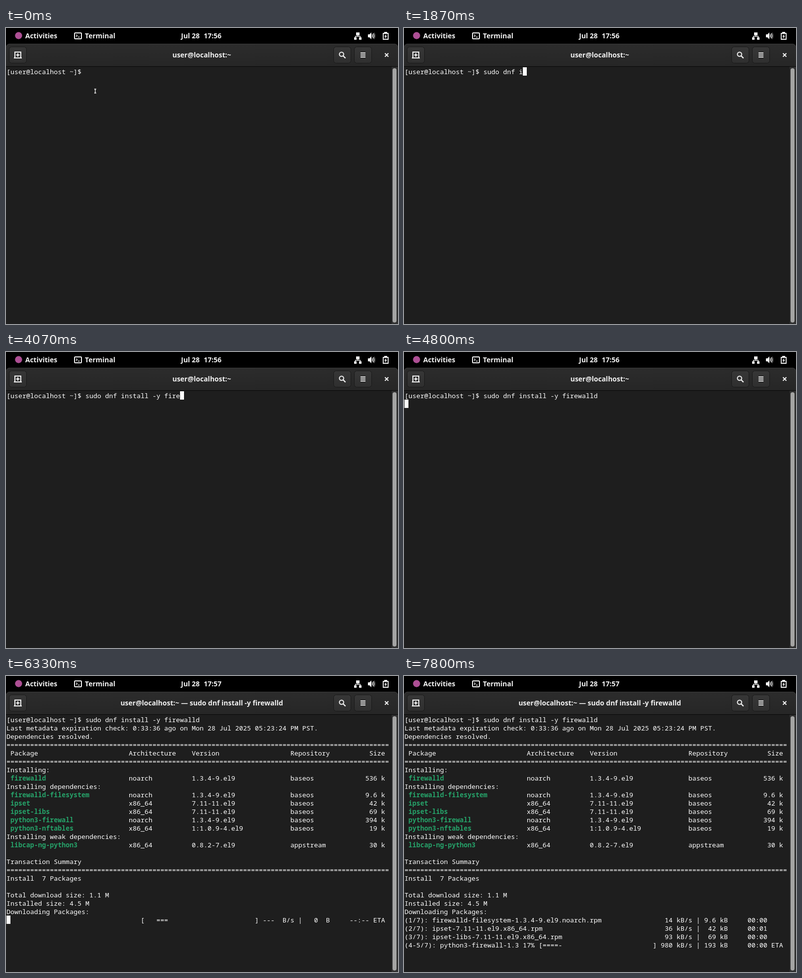
Recreate the animation shown at these times as an HTML page. Size 795 by 603 pixels, loop 8000 ms.

```html
<!DOCTYPE html>
<html lang="en">
<head>
<meta charset="utf-8">
<title>Terminal</title>
<style>
  html, body { margin: 0; width: 100%; height: 100%; overflow: hidden; background: #000; }
  svg { display: block; width: 795px; height: 603px; }
  text { white-space: pre; }
  .ui { font: 600 14px "Noto Sans", "Open Sans", sans-serif; fill: #f2f2f2; }
  .mono { font: 13.3333px "Noto Sans Mono", monospace; fill: #fff; font-variant-ligatures: none; }
  .pkg { font-weight: 700; fill: #26a269; }
  .line { fill: none; stroke: #f2f2f2; stroke-width: 2; }
</style>
</head>
<body>
<svg viewBox="0 0 795 603" xmlns="http://www.w3.org/2000/svg">
  <defs>
    <linearGradient id="bar" x1="0" y1="0" x2="0" y2="1">
      <stop offset="0" stop-color="#2c2c2c"/><stop offset="1" stop-color="#262626"/>
    </linearGradient>
    <linearGradient id="btn" x1="0" y1="0" x2="0" y2="1">
      <stop offset="0" stop-color="#373737"/><stop offset="1" stop-color="#2f2f2f"/>
    </linearGradient>
  </defs>
  <rect width="795" height="603" fill="#000"/>

  <!-- top bar -->
  <circle cx="25.5" cy="15.5" r="7.2" fill="#ad4f94"/>
  <text class="ui" x="39" y="21">Activities</text>
  <rect class="line" x="139" y="10" width="14" height="12" rx="1.5" stroke-width="1.8"/>
  <path class="line" d="M142 13.5l2.5 2.2l-2.5 2.2M146 18.5h3.5" style="stroke-width:1.3"/>
  <text class="ui" x="160" y="21">Terminal</text>
  <text class="ui" x="355" y="21">Jul 28</text>
  <text class="ui" id="clock" x="401" y="21"></text>
  <g fill="#f2f2f2">
    <path d="M710 9h7v6h-7zM706 19h5v5h-5zM716 19h5v5h-5z"/>
    <path d="M734 13h3l4-4v14l-4-4h-3z"/>
  </g>
  <path class="line" d="M713.5 15v2M708.5 19v-2h10v2" style="stroke-width:1.4"/>
  <path class="line" d="M742.5 13q2 3 0 6M744.5 11q3.6 5 0 10" style="stroke-width:1.5"/>
  <path class="line" d="M746.5 9.5q4 6.500 0 13" style="stroke-width:1.2;stroke:#777"/>
  <path class="line" d="M765 11h10v12h-10z" style="stroke-width:1.8"/>
  <path d="M767 8h6v3h-6zM771.500 12.500l-4.500 5h2.500l-1 4l4.500-5h-2.500z" fill="#f2f2f2"/>

  <!-- header bar -->
  <path d="M0 78V40q0-8 8-8h779q8 0 8 8v38z" fill="url(#bar)"/>
  <path d="M1 38q1.500-5.500 7-5.500h779q5.500 0 7 5.500" fill="none" stroke="#3a3a3a"/>
  <g fill="url(#btn)" stroke="#191919">
    <rect x="6.500" y="38.500" width="35" height="33" rx="5"/>
    <rect x="664.500" y="38.500" width="35" height="33" rx="5"/>
    <rect x="706.500" y="38.500" width="35" height="33" rx="5"/>
  </g>
  <path class="line" d="M18 60V49h12v11M16 61h16M20.500 55h7M24 51.500v7"/>
  <circle class="line" cx="680.500" cy="53.500" r="4.300"/>
  <path class="line" d="M683.500 56.500l5 5" style="stroke-width:2.400"/>
  <path class="line" d="M719 51h10M719 55h10M719 59h10"/>
  <path class="line" d="M768.500 51.500l7 7M775.500 51.500l-7 7"/>
  <text class="ui" id="title" x="397" y="60" text-anchor="middle"></text>

  <!-- terminal -->
  <rect y="78" width="795" height="525" fill="#1e1e1e"/>
  <rect y="78" width="795" height="1" fill="#080808"/>
  <rect x="781" y="79" width="14" height="524" fill="#303030"/>
  <rect x="781" y="79" width="1" height="524" fill="#1b1b1b"/>
  <rect x="784" y="82" width="8" height="518" rx="4" fill="#a4a4a3"/>
  <g id="rows"></g>
  <rect id="cursor" width="8" height="17" fill="#fff"/>
  <text class="mono" id="under" style="fill:#1e1e1e"></text>
  <path id="mouse" d="M179 124.500h4M181 124.500v8M179 132.500h4" fill="none" stroke="#fff" stroke-width="1.300"/>
</svg>
<script>
const LOOP = 8000, COL = 8, ROW = 17, LEFT = 1, TOP = 80, BASE = 94;
const $ = id => document.getElementById(id);

const PROMPT = "[user@localhost ~]$ ";
const COMMAND = "sudo dnf install -y firewalld";
const KEYS = [730, 870, 930, 1000, 1200, 1330, 1400, 1530, 1730, 1870, 2000, 2070, 2270, 2330,
  2470, 2530, 2670, 2870, 2930, 3070, 3800, 3870, 4000, 4070, 4270, 4330, 4470, 4530, 4670];
const BLINKS = [70, 670, 730, 3600, 3800, 5330, 5930, 6530, 7130, 7730];
const ENTER = 4800, TITLE = 4870, MINUTE = 4930, META = 5400, TABLE = 5470;

const rule = "=".repeat(97);
const entry = (name, arch, version, repo, size) =>
  (" " + name).padEnd(31) + arch.padEnd(16) + version.padEnd(25) + repo.padEnd(16) + size.padStart(8);
const pkg = (name, ...rest) => ({ name, text: entry(" ".repeat(name.length), ...rest) });
const stat = (rate, size, eta) => rate.padStart(8) + " | " + size.padStart(6) + "     " + eta;
const done = (label, ...s) => label.padEnd(65) + stat(...s);
const load = (label, pct, bar, ...s) =>
  label.padEnd(29) + pct.padStart(4) + " [" + bar.padEnd(28) + "] " + stat(...s);

const table = [
  "Dependencies resolved.",
  rule,
  entry("Package", "Architecture", "Version", "Repository", "Size"),
  rule,
  "Installing:",
  pkg("firewalld", "noarch", "1.3.4-9.el9", "baseos", "536 k"),
  "Installing dependencies:",
  pkg("firewalld-filesystem", "noarch", "1.3.4-9.el9", "baseos", "9.6 k"),
  pkg("ipset", "x86_64", "7.11-11.el9", "baseos", "42 k"),
  pkg("ipset-libs", "x86_64", "7.11-11.el9", "baseos", "69 k"),
  pkg("python3-firewall", "noarch", "1.3.4-9.el9", "baseos", "394 k"),
  pkg("python3-nftables", "x86_64", "1:1.0.9-4.el9", "baseos", "19 k"),
  "Installing weak dependencies:",
  pkg("libcap-ng-python3", "x86_64", "0.8.2-7.el9", "appstream", "30 k"),
  "",
  "Transaction Summary",
  rule,
  "Install  7 Packages",
  "",
  "Total download size: 1.1 M",
  "Installed size: 4.5 M",
  "Downloading Packages:"
];

// [time, row, text] of every later line update; the cursor stays on the last one
const idle = ["---  B/s", "0  B", "--:-- ETA"];
const updates = [
  [TABLE, 24, load("", "", "===", ...idle)],
  [6330, 24, load("", "", "   ===", ...idle)],
  [6470, 24, load("(1/7): firewalld-filesystem-1", "0%", "", ...idle)],
  [6730, 24, load("(1-3/7): ipset-7.11-11.el9.x8", "0%", "", ...idle)],
  [7070, 24, done("(1/7): firewalld-filesystem-1.3.4-9.el9.noarch.rpm", "14 kB/s", "9.6 kB", "00:00")],
  [7070, 25, load("(2-3/7): ipset-7.11-11.el9.x8", "0%", "", "---  B/s", "9.6 kB", "--:-- ETA")],
  [7400, 25, load("(2-4/7): ipset-libs-7.11-11.e", "2%", "", "27 kB/s", "27 kB", "00:40 ETA")],
  [7600, 25, done("(2/7): ipset-7.11-11.el9.x86_64.rpm", "36 kB/s", "42 kB", "00:01")],
  [7600, 26, load("(3-4/7): ipset-libs-7.11-11.e", "8%", "==", "150 kB/s", "92 kB", "00:06 ETA")],
  [7730, 26, done("(3/7): ipset-libs-7.11-11.el9.x86_64.rpm", "93 kB/s", "69 kB", "00:00")],
  [7730, 27, load("(4-5/7): python3-firewall-1.3", "12%", "===", "620 kB/s", "136 kB", "00:01 ETA")],
  [7800, 27, load("(4-5/7): python3-firewall-1.3", "17%", "====-", "980 kB/s", "193 kB", "00:00 ETA")]
];

function addText(x, row, cls) {
  const el = document.createElementNS("http://www.w3.org/2000/svg", "text");
  el.setAttribute("class", cls);
  el.setAttribute("x", x);
  el.setAttribute("y", BASE + row * ROW);
  $("rows").append(el);
  return el;
}
const lines = Array.from({ length: 28 }, (_, r) => addText(LEFT, r, "mono"));
const names = table.map((line, i) => line.name ? addText(LEFT + COL, i + 2, "mono pkg") : null);

function setText(el, text) {
  if (el.textContent !== text) el.textContent = text;
}
const count = (times, t) => times.filter(k => k <= t).length;

function draw(t) {
  const screen = Array(28).fill("");
  const typed = count(KEYS, t);
  let row = 0, col = PROMPT.length + typed;
  screen[0] = PROMPT + COMMAND.slice(0, typed);
  if (t >= ENTER) { row = 1; col = 0; }
  if (t >= META) screen[1] = "Last metadata expiration check: 0:33:36 ago on Mon 28 Jul 2025 05:23:24 PM PST.";
  table.forEach((line, i) => {
    const shown = t >= TABLE;
    screen[i + 2] = shown ? line.text ?? line : "";
    if (names[i]) setText(names[i], shown ? line.name : "");
  });
  for (const [at, r, text] of updates) {
    if (t >= at) { screen[r] = text; row = r; }
  }
  lines.forEach((el, r) => setText(el, screen[r]));

  const on = count(BLINKS, t) % 2 === 1;
  const x = LEFT + col * COL;
  $("cursor").setAttribute("x", x);
  $("cursor").setAttribute("y", TOP + row * ROW);
  $("cursor").setAttribute("visibility", on ? "visible" : "hidden");
  $("under").setAttribute("x", x);
  $("under").setAttribute("y", BASE + row * ROW);
  setText($("under"), on ? screen[row][col] ?? "" : "");

  $("mouse").setAttribute("visibility", t < KEYS[0] ? "visible" : "hidden");
  setText($("clock"), t < MINUTE ? "17:56" : "17:57");
  setText($("title"), "user@localhost:~" + (t < TITLE ? "" : " — " + COMMAND));
}

function tick() {
  draw(performance.now() % LOOP);
  requestAnimationFrame(tick);
}
tick();
</script>
</body>
</html>
```
